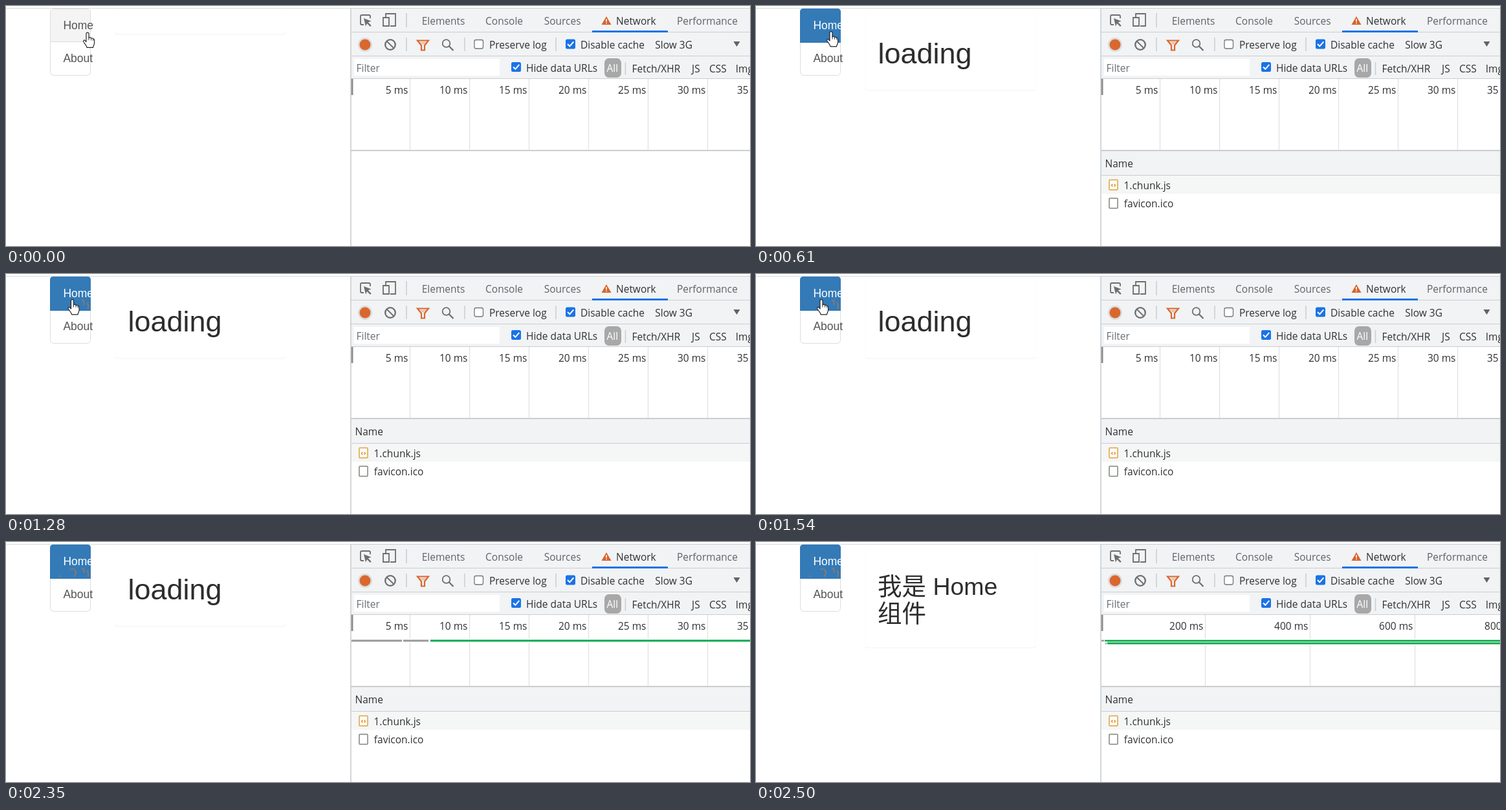
Write an HTML page that moves like this. It is 1150 by 372 pixels and loops after 2.9 s.

```html
<!DOCTYPE html>
<html lang="zh-CN">
<head>
<meta charset="utf-8">
<title>Lazy route loading</title>
<style>
  html, body { margin: 0; width: 100%; height: 100%; overflow: hidden; background: #fff; }
  svg { display: block; width: 100%; height: 100%; }
  .tools { font: 15.5px "Open Sans", "Noto Sans", sans-serif; fill: #303134; }
  .tabs { fill: #5f6368; }
  .page { font: 17.5px "Liberation Sans", Arial, sans-serif; fill: #555; }
  .title { fill: #2d2d2d; font-size: 45px; }
  .cjk { font: 37.5px "Liberation Sans", "Noto Sans CJK SC", "Noto Sans CJK", sans-serif; }
  .line { fill: none; stroke: #6e6e6e; stroke-width: 1.8; }
  .rule { stroke: #cacdd1; fill: none; }
  .bar { fill: #f1f3f4; }
  .end { text-anchor: end; }
</style>
</head>
<body>
<svg viewBox="0 0 1150 372">
  <path class="rule" d="M0 3.5H533" stroke-opacity=".75"/>

  <g class="page">
    <path id="card" fill="none" stroke="#fcfcfc"/>
    <path id="cardEdge" fill="none" stroke="#f3f3f3"/>
    <rect x="68.5" y="4.5" width="62" height="103" rx="5" fill="#fff" stroke="#ddd"/>
    <path id="hover" d="M69 55V9q0-4 4-4H126q4 0 4 4V55Z" fill="#f4f4f4"/>
    <path d="M69 55.5H130" stroke="#ddd"/>
    <path id="active" d="M68 57V9q0-5 5-5H126q5 0 5 5V57Z" fill="#337ab7"/>
    <text id="homeLink" x="88.4" y="36">Home</text>
    <text x="88.4" y="87">About</text>
    <text id="loading" class="title" x="188.5" y="89">loading</text>
    <g id="content" class="title">
      <text class="cjk" x="188" y="82">我是 Home</text>
      <text class="cjk" x="188" y="123.5">组件</text>
    </g>
  </g>

  <g class="tools">
    <rect class="bar" x="534" y="4" width="616" height="109"/>
    <path class="rule" d="M533 3.5H1150M533 40.5H1150M533 77.5H1150M533 112.5H1150"/>
    <path class="rule" d="M619 11V33M619 49V70M709 49V70M850 49V70M957.5 87V107" stroke-width="1.5"/>

    <!-- tab bar -->
    <path class="line" d="M553 29h-3q-2 0-2-2V16q0-2 2-2H561q2 0 2 2v3"/>
    <path d="M553 19l11.5 4.5-4.8 1.8 5 5-1.7 1.7-5-5-2 4.5z" fill="#6e6e6e"/>
    <path class="line" d="M587 18V12H602V31H594M583 18H592V31H583Z"/>
    <g class="tabs">
      <text x="642.7" y="29">Elements</text>
      <text x="741" y="29">Console</text>
      <text x="831.7" y="29">Sources</text>
      <text x="1037" y="29">Performance</text>
    </g>
    <text x="943" y="29">Network</text>
    <path d="M928 16L935.5 29H920.5Z" fill="#d9632c"/>
    <path d="M928 20v4.5m0 1.2v1.6" stroke="#fff" stroke-width="1.6"/>
    <rect x="906" y="38" width="117" height="3" fill="#1a73e8"/>

    <!-- action bar -->
    <circle cx="555" cy="60" r="11" fill="#dcdcdc"/>
    <circle cx="555" cy="60" r="8.5" fill="#d9682f"/>
    <path class="line" d="M588.5 54.5L599.5 65.5"/>
    <circle class="line" cx="594" cy="60" r="7.8" style="stroke-width:2.3"/>
    <path d="M636 53.5H653L647 61V68.5H642V61Z" fill="none" stroke="#d9682f" stroke-width="2.2"/>
    <path d="M639 55.5H650L645 60Z" fill="#d9682f" opacity=".35"/>
    <circle class="line" cx="680.5" cy="58" r="5.8"/>
    <path class="line" d="M685 62.5L691.5 69" style="stroke-width:2.3"/>
    <rect x="724" y="52.5" width="13.5" height="13.5" rx="2.5" fill="#fff" stroke="#767676" stroke-width="1.3"/>
    <text x="747" y="66">Preserve log</text>
    <g id="check">
      <rect x="865" y="51.5" width="15" height="15" rx="2.5" fill="#1a73e8"/>
      <path d="M868 59l3.3 3.3 6-7" fill="none" stroke="#fff" stroke-width="2"/>
    </g>
    <text x="888" y="66">Disable cache</text>
    <text x="1003.3" y="66">Slow 3G</text>
    <path d="M1124.5 55H1134.5L1129.5 63Z" fill="#5f6368"/>

    <!-- filter bar -->
    <rect x="538" y="82" width="225" height="26" fill="#fff"/>
    <text x="541.5" y="102" fill="#6b6f73">Filter</text>
    <use href="#check" x="-84" y="35.5"/>
    <text x="804" y="102">Hide data URLs</text>
    <rect x="925" y="81" width="26" height="30" rx="7" fill="#a8a8a8"/>
    <text x="928.5" y="102" fill="#fff">All</text>
    <text x="967.5" y="102.5">Fetch/XHR</text>
    <text x="1060" y="102.5">JS</text>
    <text x="1087" y="102.5">CSS</text>
    <text x="1127.7" y="102.5">Img</text>

    <!-- timeline -->
    <g id="fineScale"></g>
    <g id="coarseScale"></g>
    <rect x="533" y="113" width="3.5" height="25" fill="#8c8c8c"/>
    <g id="firstBars">
      <path d="M534 153H1150" stroke="#fff" stroke-width="6"/>
      <path d="M534 153H612M614 153H653" stroke="#999" stroke-width="3"/>
      <path d="M656 153H1150" stroke="#0ea84c" stroke-width="3"/>
    </g>
    <g id="laterBars">
      <path d="M539 155H1150" stroke="#fff" stroke-width="9"/>
      <path d="M543 155H1150" stroke="#a5dfbc" stroke-width="4"/>
      <path d="M539 153H1150M543 157.3H1150" stroke="#0ea84c" stroke-width="2.6"/>
      <path d="M534 153H538M540 157.3H542" stroke="#999" stroke-width="2.5"/>
    </g>
    <path class="rule" d="M533 224H1150" stroke-width="2"/>

    <!-- request list -->
    <g id="requests">
      <rect class="bar" x="534" y="225" width="616" height="37"/>
      <path class="rule" d="M534 262.5H1150"/>
      <rect x="534" y="263" width="616" height="28" fill="#f5f6f6"/>
      <text x="539.5" y="250">Name</text>
      <text x="568.5" y="284">1.chunk.js</text>
      <text x="568.8" y="312">favicon.ico</text>
      <rect x="546" y="269.5" width="13" height="15.5" rx="1" fill="#fff" stroke="#e0a23c" stroke-width="1.5"/>
      <path d="M551.3 276l-1.8 2 1.8 2M553.7 276l1.8 2-1.8 2" fill="none" stroke="#dc8c1e" stroke-width="1.3"/>
      <rect x="546" y="298" width="13" height="15.5" rx="1" fill="#fff" stroke="#7f857c" stroke-width="1.5"/>
    </g>
    <path class="rule" d="M533 4V372" stroke-width="1.6"/>
  </g>

  <g fill="none" stroke="#77797f" stroke-width="2.6">
    <path id="trailRight" d="M117 41h3l1 7M125 44q4 4 1 10"/>
    <path id="trailLeft" d="M99 42h6q6 5 0 12M82 53h3"/>
  </g>
  <g id="hand" stroke="#222" stroke-width="1.15" stroke-linejoin="round">
    <path fill="#fff" d="M-2 2C-2-.6 2-.6 2 2V8.5C2.5 7.2 5.3 7.3 5.6 9.3C6.3 8.3 8.5 8.6 8.7 10.3C9.5 9.5 10.6 10 10.6 12V16C10.6 20 8.8 20 8.6 23.3H-1C-1 21-4 18-6 14.7C-7.4 12.2-5 11-3.5 12.8L-2 14.5Z"/>
    <path fill="none" d="M2 8.5V12M5.6 9.3V12.3M8.7 10.3V13" stroke-width=".9"/>
  </g>
</svg>
<script>
const LOOP = 2900;
const $ = id => document.getElementById(id);
const show = (id, visible) => $(id).style.display = visible ? "" : "none";

// Hand path as [time, x, y]; the position holds until the next step.
const handSteps = [
  [0, 126, 41], [70, 121, 40.5], [140, 118, 40], [610, 116, 39.5],
  [740, 114, 39.5], [810, 112, 39.5], [940, 110, 39.5], [1010, 108.5, 39.5],
  [1080, 105.5, 39.5], [1150, 104, 39.5], [1280, 102.5, 39.5], [1540, 101, 39.5],
  [1610, 86, 43], [1680, 58, 60], [1750, 26, 80], [1820, -50, 100]
];

function buildScale(id, gap, step) {
  let marks = "";
  for (let i = 1; 533 + (i - 1) * gap < 1150; i++) {
    const x = Math.round(531.8 + i * gap) + 0.5;
    marks += `<path d="M${x} 113V223" stroke="#e1e1e1" stroke-width="1.3"/>
      <text class="end" x="${x - 3}" y="136">${i * step} ms</text>`;
  }
  $(id).innerHTML = marks;
}

function drawCard(bottom) {
  const y = bottom - 4.5;
  $("card").setAttribute("d", `M168.5 5V${y}q0 4 4 4H428q4 0 4-4V5`);
  $("cardEdge").setAttribute("d", `M169 ${y + 1}q1 3 4 3H428q3 0 4-3`);
}

function render(t) {
  const clicked = t >= 280, rescaled = t >= 2430, loaded = t >= 2500;
  show("hover", !clicked);
  show("active", clicked);
  $("homeLink").style.fill = clicked ? "#fff" : "";
  show("loading", clicked && !loaded);
  show("content", loaded);
  drawCard(loaded ? 164.5 : clicked ? 131.5 : 44.5);

  show("requests", t >= 350);
  show("fineScale", !rescaled);
  show("coarseScale", rescaled);
  show("firstBars", t >= 2350 && !rescaled);
  show("laterBars", rescaled);

  show("trailRight", t >= 940);
  show("trailLeft", t >= 1680);
  const [, x, y] = handSteps.findLast(step => step[0] <= t);
  $("hand").setAttribute("transform", `translate(${x} ${y})`);
}

buildScale("fineScale", 92, 5);
buildScale("coarseScale", 162.2, 200);

function frame() {
  render(performance.now() % LOOP);
  requestAnimationFrame(frame);
}
frame();
</script>
</body>
</html>
```
